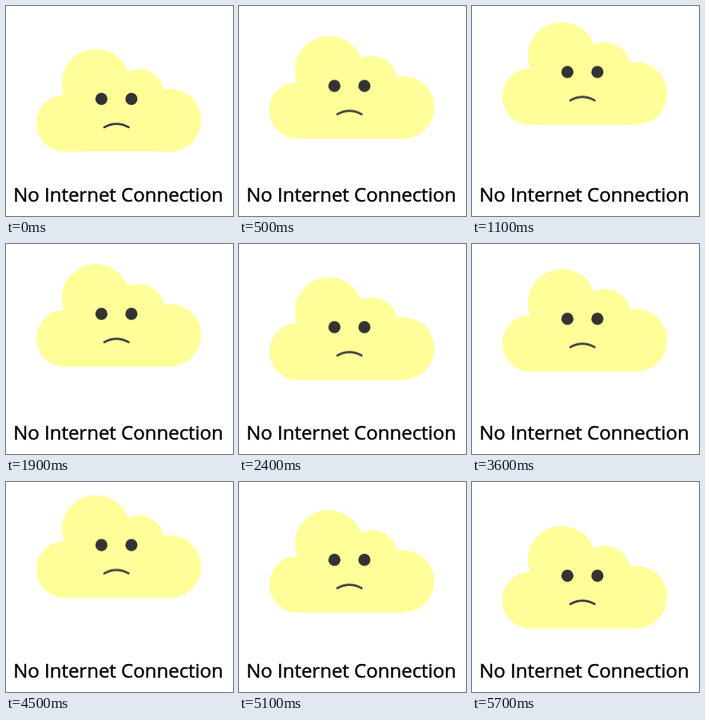
An HTML page for the animation above (5800 ms loop, 284 px wide and 263 px high).

```html
<!DOCTYPE html>
<html lang="en">
<head>
<meta charset="utf-8">
<title>No Internet Connection</title>
<style>
  html, body {
    margin: 0;
    width: 100%;
    height: 100%;
    overflow: hidden;
    background: #fff;
  }
  svg {
    display: block;
    width: 284px;
    height: 263px;
  }
  .cloud { animation: bob 2900ms -5ms infinite; }
  .body { fill: #fffe99; }
  .eye { fill: #333; }
  .mouth {
    fill: none;
    stroke: #3a3c40;
    stroke-width: 2.7;
    stroke-linecap: round;
  }
  text {
    font: 24px "Open Sans", "Noto Sans", sans-serif;
    fill: #000;
    stroke: #000;
    stroke-width: .45;
  }

  /* Ten poses per second: each segment has one step per 100 ms. */
  @keyframes bob {
    0% { transform: translateY(0); animation-timing-function: steps(1); }
    3.4483% { transform: translateY(-3.7px); animation-timing-function: steps(6); }
    24.1379% { transform: translateY(-22.7px); animation-timing-function: steps(4); }
    37.931% { transform: translateY(-33.7px); animation-timing-function: steps(3); }
    48.2759% { transform: translateY(-43.2px); animation-timing-function: steps(5); }
    65.5172% { transform: translateY(-28.9px); animation-timing-function: steps(9); }
    96.5517%, 100% { transform: translateY(1px); animation-timing-function: steps(1); }
  }
</style>
</head>
<body>
<svg viewBox="0 0 284 263">
  <g class="cloud">
    <g class="body">
      <circle cx="73.5" cy="147" r="35.6"/>
      <circle cx="112.4" cy="96.4" r="42.5"/>
      <circle cx="166" cy="111" r="32"/>
      <circle cx="205" cy="143.3" r="39.2"/>
      <path d="M73.5 182.5H205V120L166 95H112L73.5 130Z"/>
    </g>
    <circle class="eye" cx="119.4" cy="116.4" r="7.6"/>
    <circle class="eye" cx="156.9" cy="116.4" r="7.6"/>
    <path class="mouth" d="M123 151.9Q138.2 143.3 153.4 151.9"/>
  </g>
  <text x="9.2" y="245">No Internet Connection</text>
</svg>
</body>
</html>
```
